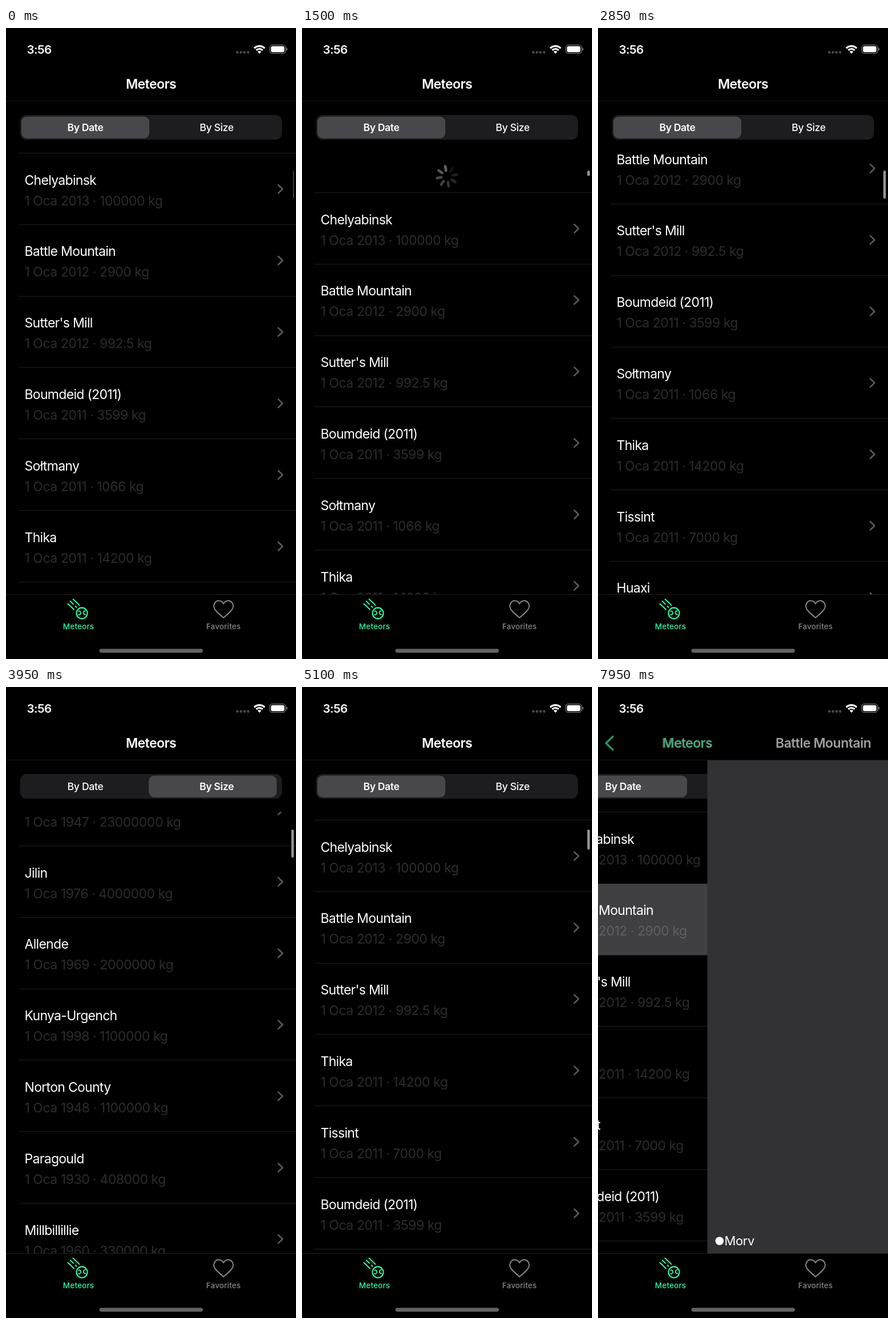
An HTML page with a canvas that plays this animation: 508 by 1102 pixels, repeating every 8000 ms.

```html
<!DOCTYPE html>
<html lang="en">
<head>
<meta charset="utf-8">
<title>Meteors</title>
<style>
html, body { margin: 0; width: 100%; height: 100%; overflow: hidden; background: #000; }
canvas { display: block; width: 508px; height: 1102px; }
</style>
</head>
<body>
<canvas id="stage"></canvas>
<script>
const W = 508, H = 1102, LOOP = 8000, STEP = 50;
const LIST_TOP = 218.5, ROW_H = 124.8, NAV_Y = 127, TAB_Y = 989;
const GREEN = '#34f5a0', GREY = '#868686';
const canvas = document.getElementById('stage');
const ctx = canvas.getContext('2d');
const dpr = window.devicePixelRatio || 1;
canvas.width = W * dpr;
canvas.height = H * dpr;

const meteor = (name, year, mass) => ({ name, info: `1 Oca ${year} · ${mass} kg` });
const byDate = [
  meteor('Chelyabinsk', 2013, 100000), meteor('Battle Mountain', 2012, 2900),
  meteor("Sutter's Mill", 2012, 992.5), meteor('Boumdeid (2011)', 2011, 3599),
  meteor('Sołtmany', 2011, 1066), meteor('Thika', 2011, 14200),
  meteor('Tissint', 2011, 7000), meteor('Huaxi', 2010, 1600)
];
const resorted = [0, 1, 2, 5, 6, 3, 4, 7].map(i => byDate[i]);
const bySize = [
  meteor('Sikhote-Alin', 1947, 23000000), meteor('Jilin', 1976, 4000000),
  meteor('Allende', 1969, 2000000), meteor('Kunya-Urgench', 1998, 1100000),
  meteor('Norton County', 1948, 1100000), meteor('Paragould', 1930, 408000),
  meteor('Millbillillie', 1960, 330000)
];

// Motion
const clamp = x => Math.min(1, Math.max(0, x));
const part = (t, a, b) => clamp((t - a) / (b - a));
const smooth = p => p * p * (3 - 2 * p);
const decay = (ms, w) => {
  const x = Math.max(0, ms) * w / 1000;
  return (1 + x) * Math.exp(-x);
};

// Positive: scrolled up the list; negative: pulled below the top
function scrollAt(t) {
  if (t < 1000) return -128 * smooth(part(t, 450, 1000));
  if (t < 1350) return -(81 + 47 * decay(t - 1000, 14));
  if (t < 2000) return -81 * decay(t - 1438, 10.9);
  if (t < 2900) return 160.7 * Math.sin(part(t, 2650, 2850) * Math.PI / 2);
  if (t < 4650) return 160.7 - 94.9 * smooth(part(t, 2950, 3200));
  if (t < 4880) return 65.8 - 119.8 * smooth(part(t, 4650, 4880));
  if (t < 5500) return -54 * decay(t - 4880, 12);
  return 0;
}

function thumbAt(t) {
  if (t < 4300) return t < 4150 ? 1 - decay(t - 3700, 21.5) : 1;
  return t < 4700 ? decay(t - 4250, 21.5) : 0;
}

// Drawing helpers
function text(str, x, y, size, color, weight = 400, spacing = 0, align = 'left') {
  ctx.font = `${weight} ${size}px Inter, "Liberation Sans", sans-serif`;
  ctx.letterSpacing = spacing + 'px';
  ctx.textAlign = align;
  ctx.fillStyle = color;
  ctx.fillText(str, x, y);
}

function box(x, y, w, h, color, r = 0) {
  ctx.fillStyle = color;
  ctx.beginPath();
  ctx.roundRect(x, y, w, h, r);
  ctx.fill();
}

function disc(x, y, r, color) {
  ctx.fillStyle = color;
  ctx.beginPath();
  ctx.arc(x, y, r, 0, 7);
  ctx.fill();
}

function line(color, width, ...pts) {
  ctx.strokeStyle = color;
  ctx.lineWidth = width;
  ctx.beginPath();
  for (let i = 0; i < pts.length; i += 2) ctx.lineTo(pts[i], pts[i + 1]);
  ctx.stroke();
}

function arc(x, y, r, a, b, color, width) {
  ctx.strokeStyle = color;
  ctx.lineWidth = width;
  ctx.beginPath();
  ctx.arc(x, y, r, a, b);
  ctx.stroke();
}

function clipped(x, y, w, h, draw) {
  ctx.save();
  ctx.beginPath();
  ctx.rect(x, y, w, h);
  ctx.clip();
  draw();
  ctx.restore();
}

// Screen parts
function statusBar() {
  text('3:56', 36.5, 45, 20.6, '#fff', 600, -0.6);
  for (let i = 0; i < 4; i++) disc(405.3 + i * 6.3, 42.6, 2.3, '#4a4a4c');

  ctx.lineCap = 'butt';
  const a = -Math.PI * 0.75, b = -Math.PI * 0.25;
  arc(444, 44.5, 12.8, a, b, '#fff', 3.2);
  arc(444, 44.5, 8, a, b, '#fff', 3.2);
  ctx.fillStyle = '#fff';
  ctx.beginPath();
  ctx.moveTo(444, 45);
  ctx.arc(444, 44.5, 4.6, a, b);
  ctx.fill();
  ctx.lineCap = 'round';

  ctx.strokeStyle = '#747476';
  ctx.lineWidth = 1.3;
  ctx.beginPath();
  ctx.roundRect(462, 29.6, 27.8, 14.8, 4.6);
  ctx.stroke();
  box(464.2, 31.7, 23.4, 10.6, '#fff', 2.8);
  box(491, 34.5, 1.8, 5, '#747476', 1);
}

function navBar(p) {
  const x = 254 - 157.5 * p;
  if (p < 1) {
    ctx.globalAlpha = 1 - p;
    text('Meteors', x, 106, 23, '#fff', 600, -0.56, 'center');
  }
  if (p > 0) {
    ctx.globalAlpha = p;
    text('Meteors', x + 1, 106, 23, GREEN, 400, -0.4, 'center');
    line(GREEN, 3.2, 26, 86.5, 14, 98, 26, 109.5);
    text('Battle Mountain', 254 + 373 * (1 - p), 106, 23, '#fff', 600, -0.5, 'center');
  }
  ctx.globalAlpha = 1;
  box(0, NAV_Y, W, 1, '#171718');
}

function segments(pos) {
  const right = pos > 0.5;
  box(24.5, 152, 459, 43, '#1d1d1f', 11.5);
  box(27 + 230 * pos, 154.7, 224, 38, '#48474c', 9.5);
  text('By Date', 139, 180, 17.6, '#fff', right ? 500 : 600, -0.35, 'center');
  text('By Size', 369, 180, 17.6, '#fff', right ? 600 : 500, -0.35, 'center');
}

function spinner(t, pull) {
  if (pull < 25 || t > 1800) return;
  const end = part(t, 1450, 1800);
  const spinning = t >= 1000;
  const shown = spinning ? 8 : Math.floor(clamp((pull - 35) / 80) * 8);
  const head = Math.floor((t - 1500) / 125) + 80;
  ctx.save();
  ctx.translate(254, 259);
  ctx.rotate(-1.2 * end);
  ctx.scale(1 - end * end, 1 - end * end);
  for (let i = 0; i < shown; i++) {
    const age = (head - i) % 8;
    const level = spinning ? 0.45 - age * 0.052 : 0.4;
    ctx.save();
    ctx.rotate(i * Math.PI / 4);
    ctx.globalAlpha = level * (1 - 0.6 * end);
    line('#ebebf5', 4.8, 0, -10.5, 0, -18);
    ctx.restore();
  }
  ctx.restore();
}

function list(rows, scroll, pressed, t) {
  const top = LIST_TOP - scroll;
  if (t < 2000) clipped(0, 218, W, Math.max(0, top - 218), () => spinner(t, -scroll));
  rows.forEach((row, i) => {
    const y = top + i * ROW_H;
    if (pressed && i === 1) box(0, y, W, ROW_H, '#404042');
    box(22, Math.round(y - 0.5), W - 22, 1, '#1e1e20');
    text(row.name, 32.5, y + 55, 23, '#fff', 400, -0.7);
    text(row.info, 32.5, y + 91, 23, 'rgba(235,235,245,0.19)', 400, -0.48);
    line('#5a5a5e', 2.6, 477, y + 55.5, 484.5, y + 62.7, 477, y + 69.9);
  });
}

function scrollBar(t, scroll) {
  if (t >= 7550) return;
  if (t >= 500 && t < 6700) {
    ctx.globalAlpha = 1 - part(t, 6500, 6700);
    box(499.7, 249, 4.6, Math.max(9.5, 49 + Math.min(0, scroll)), '#929294', 2.3);
    ctx.globalAlpha = 1;
  }
  if (t < 500 || t >= 6550) box(503, 250, 1, 47, '#6c6c6e');
}

function detail(p) {
  const x = W * (1 - p);
  box(x, NAV_Y + 1, W, TAB_Y - NAV_Y - 1, '#323235');
  disc(x + 21.3, 967.5, 7.3, '#fff');
  text('Morv', x + 30, 975, 22, '#fff', 400, -0.4);
}

function meteorIcon() {
  line(GREEN, 2, 117.5, 997.5, 128.5, 1008);
  line(GREEN, 2, 112.5, 1001, 118, 1006.3);
  line(GREEN, 2, 121.5, 1009.8, 123.5, 1011.7);
  line(GREEN, 2, 108.5, 1005.5, 119, 1015.5);
  arc(133, 1022, 9.6, 0, 7, GREEN, 2.1);
  arc(128, 1021.5, 3.2, -1.9, 1.9, GREEN, 1.9);
  arc(138.8, 1021, 3.2, 1.4, 4.7, GREEN, 1.9);
}

function heartIcon() {
  ctx.strokeStyle = GREY;
  ctx.lineWidth = 2.1;
  ctx.beginPath();
  for (const s of [1, -1]) {
    ctx.moveTo(381, 1005.5);
    ctx.bezierCurveTo(381 + s * 4, 998.5, 381 + s * 12, 999, 381 + s * 15, 1003.7);
    ctx.bezierCurveTo(381 + s * 18.5, 1009, 381 + s * 16.5, 1014.5, 381 + s * 13, 1018);
    ctx.quadraticCurveTo(381 + s * 7, 1024.5, 381, 1030);
  }
  ctx.stroke();
}

function tabBar() {
  box(0, TAB_Y, W, H - TAB_Y, '#000');
  box(0, TAB_Y, W, 1, '#1c1c1e');
  meteorIcon();
  heartIcon();
  text('Meteors', 127, 1050.3, 13.5, GREEN, 500, 0.15, 'center');
  text('Favorites', 381, 1050.3, 13.5, GREY, 500, 0.15, 'center');
  box(163.5, 1084.3, 181.5, 6.6, '#636365', 3.3);
}

function draw(t) {
  const scroll = scrollAt(t);
  const push = t >= 7900 ? 1 - decay(t - 7850, 21.1) : 0;
  const rows = t < 3750 ? byDate : t < 4300 ? bySize : resorted;
  ctx.setTransform(dpr, 0, 0, dpr, 0, 0);
  ctx.lineCap = ctx.lineJoin = 'round';
  box(0, 0, W, H, '#000');

  ctx.save();
  ctx.translate(-W * 0.3 * push, 0);
  segments(thumbAt(t));
  clipped(0, 218, W, TAB_Y - 218, () => list(rows, scroll, t >= 7550, t));
  scrollBar(t, scroll);
  ctx.restore();

  if (push > 0) detail(push);
  statusBar();
  navBar(push);
  tabBar();
}

const start = performance.now();
function tick() {
  const t = (performance.now() - start) % LOOP;
  draw(Math.floor(t / STEP) * STEP);
  requestAnimationFrame(tick);
}
tick();
</script>
</body>
</html>
```
